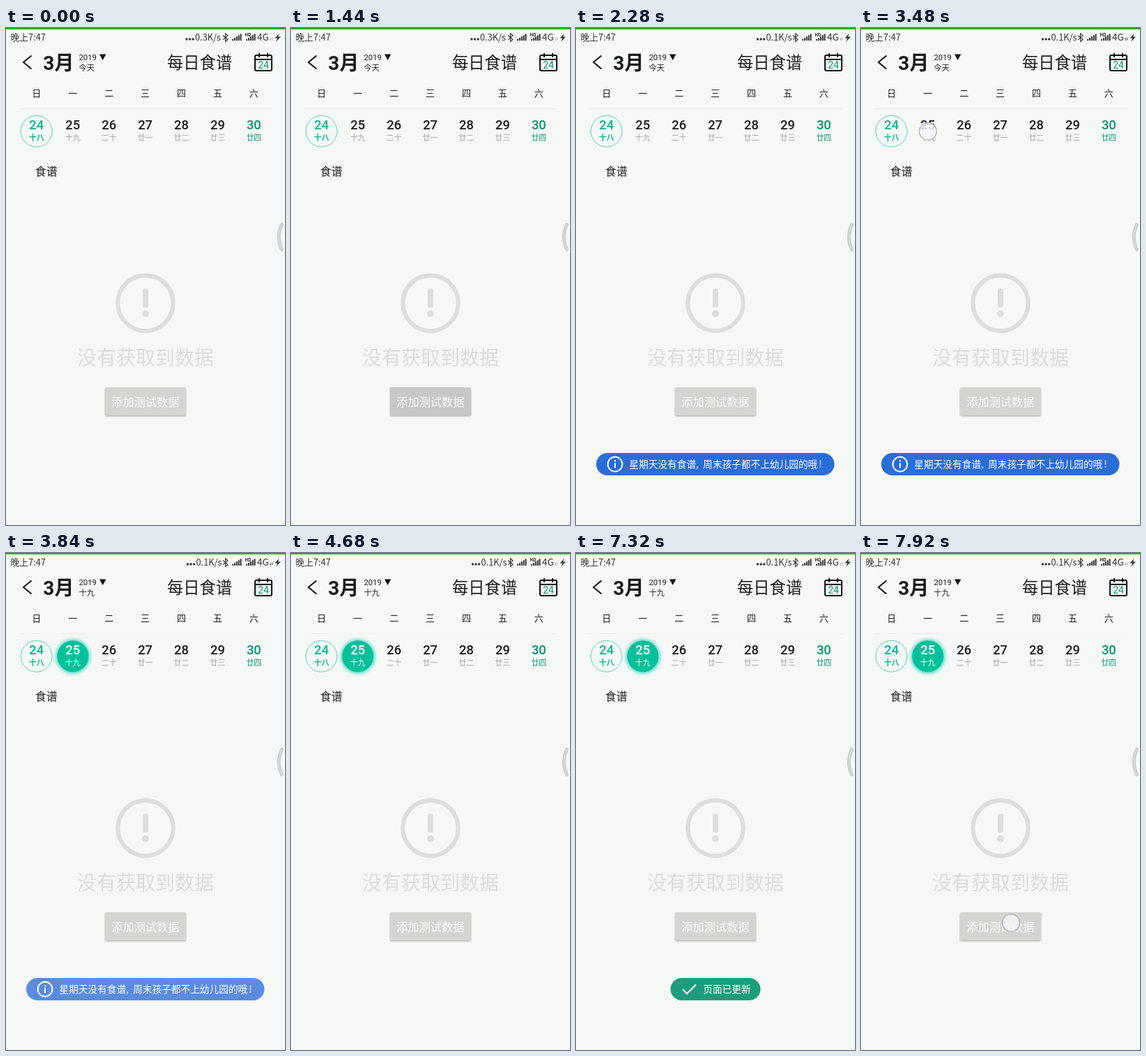
An HTML page for the animation above (8 s loop, 400x711 px).

```html
<!DOCTYPE html>
<html lang="zh-CN">
<head>
<meta charset="utf-8">
<title>每日食谱</title>
<style>
html, body { margin: 0; width: 100%; height: 100%; overflow: hidden; background: #f6f8f5; }
svg { display: block; width: 100%; height: 100%; }
text { font-family: "Noto Sans CJK SC", "Noto Sans CJK", sans-serif; fill: #1c1c1c; white-space: pre; }
.num { font-family: Roboto, sans-serif; }
.mid { text-anchor: middle; }
.line { fill: none; stroke: #111; stroke-width: 2; }
.day { font-size: 18.4px; font-weight: 500; }
.lunar { font-size: 10.9px; fill: #a0a2a0; }
.toast text { font-size: 13.7px; fill: #fff; }
.toast .line { stroke: #fff; }
</style>
</head>
<body>
<svg viewBox="0 0 400 711">
  <defs>
    <filter id="glow" x="-40%" y="-40%" width="180%" height="180%"><feGaussianBlur stdDeviation="2.6"/></filter>
    <filter id="shade" x="-10%" y="-20%" width="120%" height="150%"><feGaussianBlur stdDeviation="1.2"/></filter>
  </defs>
  <rect width="400" height="711" fill="#f6f8f5"/>
  <rect width="400" height="2" fill="#3fa30b"/>

  <!-- status bar -->
  <g fill="#333">
    <text x="6.5" y="18" font-size="12.8" style="fill:#333">晚上7:47</text>
    <g id="dots"><circle cx="259" cy="16" r="1.7"/><circle cx="263.6" cy="16" r="1.7"/><circle cx="268.2" cy="16" r="1.7"/></g>
    <text id="speed" y="18" font-size="12.8" style="fill:#333"></text>
    <path d="M311 10.5l7 6-3.4 3V8l3.4 2.8-7 6" fill="none" stroke="#333" stroke-width="1.1"/>
    <g id="bars"></g>
    <text x="342.5" y="12" font-size="6" font-weight="700">HD</text>
    <text x="360" y="18" font-size="13.6" style="fill:#333">4G</text>
    <path id="net" d="M379.5 14v4M382 13.5v4" stroke="#333" stroke-width="1"/>
    <path d="M391.5 8l-6 6.4h3.6l-2 5.4 6.8-7.2h-3.8z"/>
  </g>

  <!-- header -->
  <path class="line" d="M36.5 39.5L25 49l11.500 9.500"/>
  <text x="53.3" y="60" font-size="28" font-weight="700"><tspan class="num">3</tspan>月</text>
  <text class="num" x="104.5" y="45.5" font-size="11.3">2019</text>
  <path d="M134 37.5h9.4l-4.7 8.5z" fill="#111"/>
  <text id="today" x="104.5" y="61" font-size="11.2"></text>
  <text x="231" y="58" font-size="23.3">每日食谱</text>
  <path class="line" d="M359 39h20q2 0 2 2v18q0 2-2 2h-20q-2 0-2-2v-18q0-2 2-2zM357 45h24M363 36v6M375 36v6"/>
  <text class="num mid" x="369" y="58.4" font-size="14" style="fill:#0a9873">24</text>

  <!-- week -->
  <path d="M18 115.5h364" stroke="#ebedea"/>
  <circle cx="43.7" cy="147.7" r="22.4" fill="none" stroke="#58cfb6"/>
  <g id="pick">
    <circle cx="96" cy="148" r="24.5" fill="#4fd9c6" filter="url(#glow)"/>
    <circle cx="95.8" cy="147.7" r="22.5" fill="#04c09a"/>
  </g>
  <g id="week"></g>
  <text x="41.8" y="211" font-size="16">食谱</text>

  <!-- edge handle -->
  <path d="M395.5 281q-8.5 18 0 36" fill="none" stroke="#b8bab8" stroke-width="4.6" stroke-linecap="round"/>
  <path d="M395.5 281q-8.5 18 0 36" fill="none" stroke="#d6d8d5" stroke-width="3.2" stroke-linecap="round"/>

  <!-- empty state -->
  <g fill="#dcdedb">
    <circle cx="200" cy="393.6" r="39.7" fill="none" stroke="#dcdedb" stroke-width="6.2"/>
    <rect x="196" y="373" width="8" height="27" rx="3"/>
    <circle cx="200" cy="408.7" r="5"/>
  </g>
  <text x="102" y="481.5" font-size="28" font-weight="300" style="fill:#dadcd9">没有获取到数据</text>
  <rect x="142" y="515.5" width="116" height="40" rx="2" fill="#b0b2af" filter="url(#shade)"/>
  <rect id="button" x="142" y="514" width="116" height="40" rx="2"/>
  <text x="151.3" y="540.5" font-size="16.2" style="fill:#fafbf9">添加测试数据</text>

  <!-- toasts -->
  <g id="info" class="toast">
    <rect x="29" y="608" width="341.5" height="32" rx="16" fill="#2a6cd8"/>
    <circle class="line" cx="56" cy="624" r="10.4"/>
    <path class="line" d="M56 618v2.3M56 622.3v7.2"/>
    <text x="76.3" y="629.2">星期天没有食谱,<tspan x="182">周末孩子都不上幼儿园的哦</tspan><tspan dx="2">!</tspan></text>
  </g>
  <g id="done" class="toast">
    <rect x="135.5" y="608" width="129" height="32" rx="16" fill="#07946f"/>
    <path class="line" d="M153 624.5l6 6 13-13"/>
    <text x="182.3" y="629.2">页面已更新</text>
  </g>
  <circle id="touch" r="12.3" fill="#f4f5f6" fill-opacity=".85" stroke="#b4b9d2" stroke-width="1.6"/>
</svg>
<script>
const $ = id => document.getElementById(id);
const LOOP = 8000, STEP = 120;
const lunar = ['十八', '十九', '二十', '廿一', '廿二', '廿三', '廿四'];

$('week').innerHTML = lunar.map((name, i) => {
  const x = 43.8 + 51.93 * i;
  const tint = i === 0 ? 'style="fill:#04b793"' : i === 6 ? 'style="fill:#07946f"' : '';
  const weight = i === 0 ? 700 : i === 6 ? 500 : 400;
  return `<text class="mid" x="${x}" y="98.4" font-size="13">${'日一二三四五六'[i]}</text>
    <text class="num mid day" x="${x}" y="145.3" ${tint}>${24 + i}</text>
    <text class="mid lunar" x="${x}" y="161.2" font-weight="${weight}" ${tint}>${name}</text>`;
}).join('');
const picked = [...$('week').querySelectorAll('.day, .lunar')].slice(2, 4);

$('bars').innerHTML = [324, 344].map(x => [0, 1, 2, 3, 4].map(i =>
  `<rect x="${x + i * 2.9}" y="${16 - i * 1.9}" width="2" height="${2 + i * 1.9}"/>`).join('')).join('');

const clamp = v => Math.max(0, Math.min(1, v));
const within = (t, a, b) => t >= a && t < b;

// Springs up from below, then fades out in place.
function toast(el, t, start, fade) {
  const age = Math.max(0, t - start);
  const y = 198 * Math.exp(-0.0191 * age) * Math.cos(Math.PI * age / 230);
  el.setAttribute('opacity', clamp(age / 200) * clamp(1 - (t - fade) / 300));
  el.setAttribute('transform', `translate(0 ${y})`);
}

const taps = [[1200, 1440, 216, 529], [3480, 3600, 96, 148], [7920, LOOP, 215, 529]];

function draw(t) {
  const chosen = t >= 3600;
  const slow = t >= 2280;
  const shift = slow ? 1.5 : 0;
  $('speed').textContent = slow ? '0.1K/s' : '0.3K/s';
  $('speed').setAttribute('x', 271 + shift);
  $('dots').setAttribute('transform', `translate(${shift} 0)`);
  $('net').setAttribute('opacity', within(t, 3480, 4680) ? 0.9 : 0.4);
  $('today').textContent = chosen ? '十九' : '今天';
  $('pick').setAttribute('opacity', chosen ? 1 : 0);
  picked.forEach(el => el.style.fill = chosen ? '#fff' : '');
  $('button').setAttribute('fill', within(t, 1440, 1920) ? '#c6c8c5' : '#d3d5d0');
  toast($('info'), t, 1490, 3770);
  toast($('done'), t, 5045, 7290);
  const tap = taps.find(([a, b]) => within(t, a, b));
  $('touch').setAttribute('opacity', tap ? 1 : 0);
  if (tap) $('touch').setAttribute('transform', `translate(${tap[2]} ${tap[3]})`);
}

const begin = performance.now();
function tick() {
  const t = (performance.now() - begin) % LOOP;
  draw(Math.floor(t / STEP) * STEP);
  requestAnimationFrame(tick);
}
tick();
</script>
</body>
</html>
```
